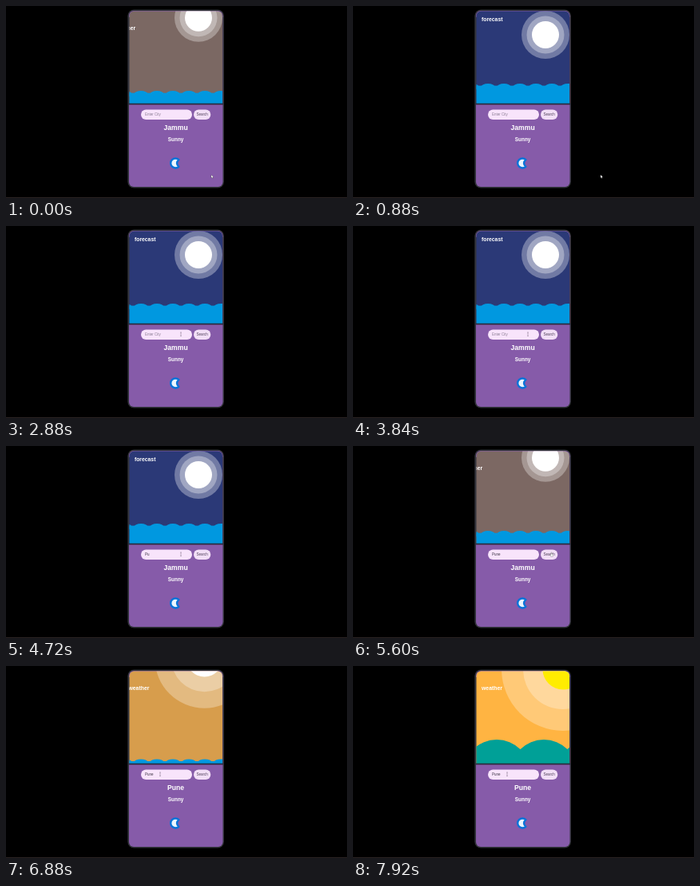
Write an HTML page with a canvas that moves like this. It is 427x240 px and loops after 8000 ms.

```html
<!DOCTYPE html>
<html lang="en">
<head>
<meta charset="utf-8">
<title>Weather</title>
<style>
html, body { margin: 0; width: 100%; height: 100%; overflow: hidden; background: #000; }
canvas { display: block; width: 100vw; height: 100vh; }
</style>
</head>
<body>
<canvas id="stage"></canvas>
<script>
const W = 427, H = 240, LOOP = 8000;
const SANS = '"Liberation Sans", Arial, sans-serif';
const MIDNIGHT = 2800;
const NIGHT_SKY = [43, 57, 119], DAY_SKY = [255, 180, 66];
const canvas = document.getElementById('stage');
const ctx = canvas.getContext('2d');

const clamp = x => Math.max(0, Math.min(1, x));
const smooth = x => x * x * (3 - 2 * x);
const mix = (a, b, k) => a + (b - a) * k;
const ramp = (x, from, to) => clamp((x - from) / (to - from));
const rgb = c => `rgb(${c.map(Math.round).join(',')})`;

function disc(x, y, r, fill) {
  ctx.fillStyle = fill;
  ctx.beginPath();
  ctx.arc(x, y, r, 0, Math.PI * 2);
  ctx.fill();
}

function box(x, y, w, h, r, fill) {
  ctx.fillStyle = fill;
  ctx.beginPath();
  ctx.roundRect(x, y, w, h, r);
  ctx.fill();
}

function label(str, x, y, size, fill = '#fff', weight = 700, align = 'left') {
  ctx.font = `${weight} ${size}px ${SANS}`;
  ctx.textAlign = align;
  ctx.fillStyle = fill;
  ctx.fillText(str, x, y);
}

// The change from night to day mirrors itself around midnight.
function daylight(t) {
  const u = ramp(Math.abs(t - MIDNIGHT), 1920, 5150);
  return 1 - Math.pow(1 - u, 1.5);
}

function drawOrb(day, settle) {
  const grow = ramp(day, 0.4, 1);
  const x = 241 + 11 * (grow + settle);
  const y = 36 - 56 * day + 24 * settle;
  const glow = `rgba(255,255,255,${mix(0.33, 0.28, day)})`;
  disc(x, y, mix(30, 77, grow), glow);
  disc(x, y, mix(23.5, 50, grow), glow);
  disc(x, y, mix(17, 25.5, grow), rgb([255, mix(255, 236, settle), mix(255, 0, settle)]));
}

function drawClouds(day, settle) {
  const top = 97 + 24 * day + 6 * settle;
  ctx.fillStyle = '#0098e0';
  ctx.fillRect(153, top + 2.6, 120, 40);
  for (let x = 149; x < 280; x += 20) {
    ctx.beginPath();
    ctx.ellipse(x, top + 4, 8.5, 4, 0, 0, Math.PI * 2);
    ctx.fill();
  }
}

function drawHills(settle) {
  for (let x = 180; x < 300; x += 59) disc(x, 134 + 36 * (1 - settle), 42, '#00a097');
}

function drawScene(t) {
  const day = daylight(t);
  const settle = smooth(ramp(day, 0.82, 0.99));
  ctx.save();
  ctx.beginPath();
  ctx.roundRect(154.5, 6.5, 116.5, 116, [6, 6, 0, 0]);
  ctx.clip();
  ctx.fillStyle = rgb(NIGHT_SKY.map((c, i) => mix(c, DAY_SKY[i], day)));
  ctx.fillRect(153, 5, 120, 118);
  drawOrb(day, settle);
  drawClouds(day, settle);
  drawHills(settle);
  label('weather', 161 - 40 * (1 - day), 29.5, 6.9);
  label('forecast', 161 - 90 * day, 18.5, 6.8);
  ctx.restore();
}

function drawMoonIcon() {
  const x = 212.2, y = 196.5, r = 6, tip = 0.8;
  ctx.beginPath();
  ctx.arc(x, y, r, tip, -tip);
  ctx.quadraticCurveTo(x - 0.5, y, x + r * Math.cos(tip), y + r * Math.sin(tip));
  ctx.closePath();
  ctx.fillStyle = '#eaf6ff';
  ctx.fill();
  ctx.strokeStyle = '#0873d8';
  ctx.lineWidth = 2.4;
  ctx.lineJoin = 'round';
  ctx.stroke();
}

function drawPanel(t) {
  const typed = 'Pune'.slice(0, Math.max(0, Math.floor((t - 4250) / 200)));
  box(169, 129.5, 64, 12.5, 6.25, '#f8e4fb');
  box(235, 129.5, 21.3, 12.5, 6.25, '#f2dff6');
  label(typed || 'Enter City', 174, 137.3, 4.5, typed ? '#3c3344' : '#8c7d94', 400);
  label('Search', 245.7, 137.3, 4.55, '#51425c', 400, 'center');
  label(t < 6000 ? 'Jammu' : 'Pune', 212.6, 154.5, 8.6, '#fff', 700, 'center');
  label('Sunny', 212.6, 169.3, 6.4, '#fff', 700, 'center');
  drawMoonIcon();
}

function mouseAt(t) {
  const pos = { x: 257, y: 211 };
  const glide = (x, y, from, to) => {
    const k = smooth(ramp(t, from, to));
    pos.x = mix(pos.x, x, k);
    pos.y = mix(pos.y, y, k);
  };
  glide(310, 211, 0, 640);
  glide(219, 135, 1000, 1700);
  glide(248, 134, 5050, 5400);
  glide(193, 135, 6000, 6450);
  return pos;
}

function pointer(x, y, path) {
  ctx.save();
  ctx.translate(x, y);
  const p = new Path2D(path);
  ctx.fillStyle = '#fff';
  ctx.fill(p);
  ctx.strokeStyle = '#333';
  ctx.lineWidth = 0.3;
  ctx.stroke(p);
  ctx.restore();
}

function drawMouse(t) {
  const { x, y } = mouseAt(t);
  const inRow = y > 129 && y < 142;
  if (inRow && x > 169 && x < 233) {
    ctx.fillStyle = '#8a7a92';
    ctx.fillRect(x - 0.3, y - 2, 0.6, 4.5);
    ctx.fillRect(x - 1, y - 2.3, 2, 0.5);
    ctx.fillRect(x - 1, y + 2.2, 2, 0.5);
  } else if (inRow && x >= 235 && x < 256) {
    pointer(x, y, 'M0-1H.9V1L2.8 1.5 2.3 4H-.3L-1.4 1.8 0 2Z');
  } else {
    pointer(x, y, 'M0 0V4L.9 3.2 1.6 4.6 2.2 4.3 1.6 2.9 2.8 2.8Z');
  }
}

function draw(t) {
  ctx.fillStyle = '#000';
  ctx.fillRect(0, 0, W, H);
  ctx.fillStyle = '#2a2222';
  ctx.fillRect(0, H - 1, W, 1);
  box(152.3, 4.5, 120.7, 223, 8, '#33343c');
  box(154, 6, 117.5, 220, 6, '#865ba9');
  ctx.fillStyle = '#33343c';
  ctx.fillRect(154, 14, 117.5, 108);
  drawScene(t);
  ctx.fillStyle = '#2b2a3c';
  ctx.fillRect(153, 121.7, 119.5, 1.7);
  drawPanel(t);
  drawMouse(t);
}

function resize() {
  const dpr = window.devicePixelRatio || 1;
  canvas.width = Math.round(innerWidth * dpr);
  canvas.height = Math.round(innerHeight * dpr);
}

function frame() {
  ctx.setTransform(canvas.width / W, 0, 0, canvas.height / H, 0, 0);
  draw(performance.now() % LOOP);
  requestAnimationFrame(frame);
}

addEventListener('resize', resize);
resize();
frame();
</script>
</body>
</html>
```
